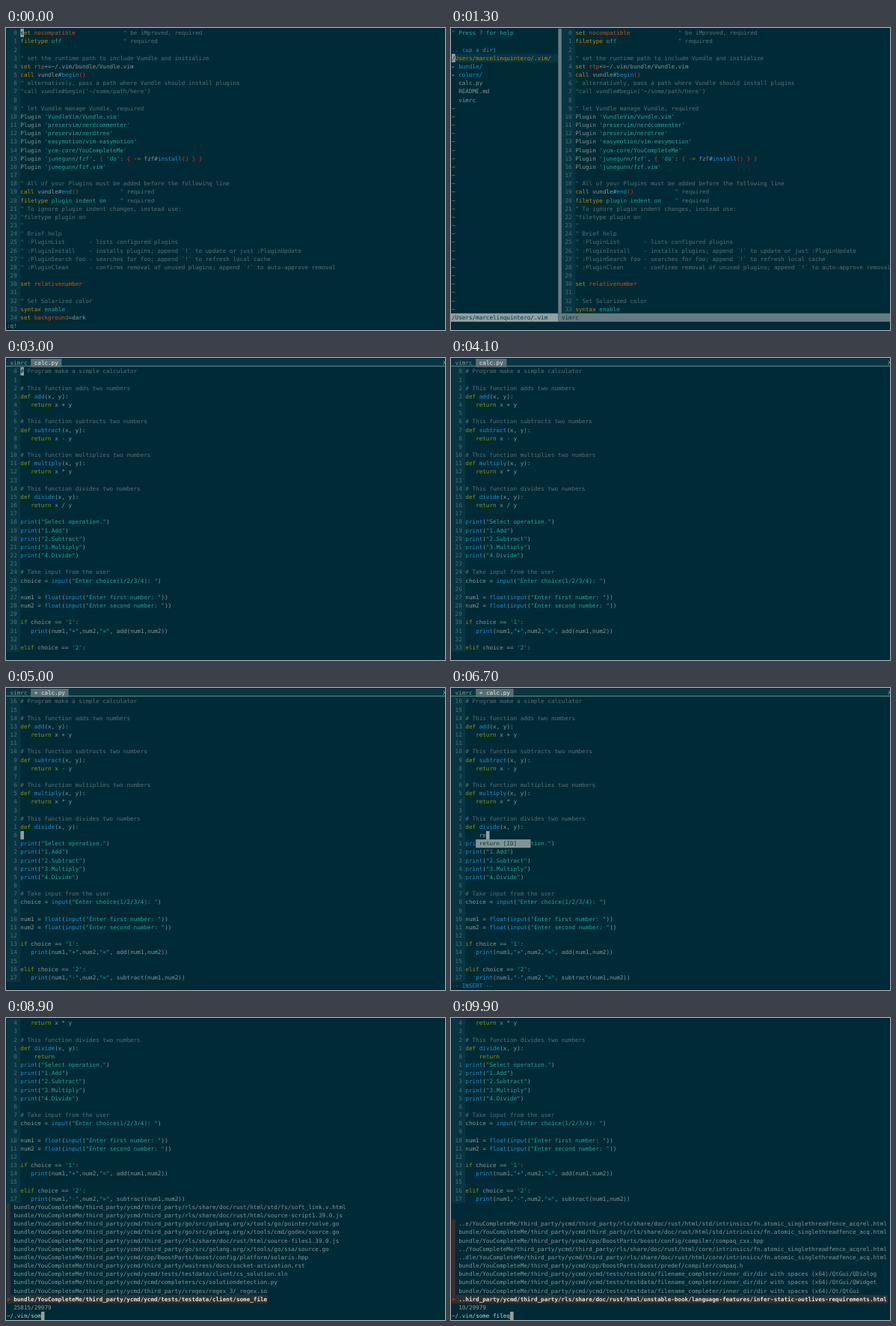
Recreate the animation shown at these times as an HTML page. Size 587 by 403 pixels, loop 10000 ms.

```html
<!DOCTYPE html>
<html lang="en">
<head>
<meta charset="utf-8">
<title>Vim session</title>
<style>
  html, body { margin: 0; width: 100%; height: 100%; overflow: hidden; background: #002b36; }
  svg { display: block; width: 587px; height: 403px; }
  text {
    font: 7.624px "DejaVu Sans Mono", "Noto Sans Mono", monospace;
    white-space: pre;
    text-rendering: geometricPrecision;
  }
  .bold { font-weight: bold; }
</style>
</head>
<body>
<svg id="screen" viewBox="0 0 587 403"></svg>
<script>
const CW = 4.59, RH = 11.17, PAD = 1, BASELINE = 9.2;
const LOOP = 10000, STEP = 100;
const C = {
  bg: '#002b36', panel: '#073642', dim: '#586e75', mid: '#657b83', fg: '#839496',
  light: '#93a1a1', pale: '#eee8d5', yellow: '#b58900', orange: '#cb4b16', red: '#dc322f',
  blue: '#268bd2', cyan: '#2aa198', green: '#859900'
};

const vimrc = `set nocompatible              " be iMproved, required
filetype off                  " required

" set the runtime path to include Vundle and initialize
set rtp+=~/.vim/bundle/Vundle.vim
call vundle#begin()
" alternatively, pass a path where Vundle should install plugins
"call vundle#begin('~/some/path/here')

" let Vundle manage Vundle, required
Plugin 'VundleVim/Vundle.vim'
Plugin 'preservim/nerdcommenter'
Plugin 'preservim/nerdtree'
Plugin 'easymotion/vim-easymotion'
Plugin 'ycm-core/YouCompleteMe'
Plugin 'junegunn/fzf', { 'do': { -> fzf#install() } }
Plugin 'junegunn/fzf.vim'

" All of your Plugins must be added before the following line
call vundle#end()            " required
filetype plugin indent on    " required
" To ignore plugin indent changes, instead use:
"filetype plugin on
"
" Brief help
" :PluginList       - lists configured plugins
" :PluginInstall    - installs plugins; append \`!\` to update or just :PluginUpdate
" :PluginSearch foo - searches for foo; append \`!\` to refresh local cache
" :PluginClean      - confirms removal of unused plugins; append \`!\` to auto-approve removal

set relativenumber

" Set Solarized color
syntax enable
set background=dark`.split('\n');

const calc = `# Program make a simple calculator

# This function adds two numbers
def add(x, y):
   return x + y

# This function subtracts two numbers
def subtract(x, y):
   return x - y

# This function multiplies two numbers
def multiply(x, y):
   return x * y

# This function divides two numbers
def divide(x, y):
   return x / y

print("Select operation.")
print("1.Add")
print("2.Subtract")
print("3.Multiply")
print("4.Divide")

# Take input from the user
choice = input("Enter choice(1/2/3/4): ")

num1 = float(input("Enter first number: "))
num2 = float(input("Enter second number: "))

if choice == '1':
   print(num1,"+",num2,"=", add(num1,num2))

elif choice == '2':
   print(num1,"-",num2,"=", subtract(num1,num2))`.split('\n');

const syntax = rules => ({
  pattern: new RegExp(rules.map(r => `(${r[0]})`).join('|'), 'g'),
  colors: rules.map(r => r[1])
});
const vimSyntax = syntax([
  ['".*', C.dim],
  ["'[^']*'", C.cyan],
  ['^(?:set|filetype|call|syntax)\\b', C.yellow],
  ['\\b(?:nocompatible|rtp|relativenumber|background)\\b', C.orange],
  ['\\b(?:off|plugin indent on|enable)\\b', C.cyan],
  ['(?<=#)\\w+', C.blue],
  ['->', C.green],
  ['[(){}]', C.red]
]);
const pySyntax = syntax([
  ['#.*', C.dim],
  [`"[^"]*"|'[^']*'`, C.cyan],
  ['\\b(?:def|return|if|elif)\\b', C.green],
  ['\\b(?:print|input|float)\\b|(?<=def )\\w+', C.blue]
]);

const home = '/Users/marcelinquintero/.vim';
const treeNodes = [
  ['" Press ? for help', C.cyan], ['', C.fg], ['.. (up a dir)', C.blue],
  [home + '/', C.yellow], ['▸ bundle/', C.blue], ['▸ colors/', C.blue],
  ['  calc.py', C.fg], ['  README.md', C.fg], ['  vimrc', C.fg]
];

const ycm = 'YouCompleteMe/third_party/ycmd/';
const root = 'bundle/' + ycm;
const rust = 'third_party/rls/share/doc/rust/html/';
const goTools = 'third_party/go/src/golang.org/x/tools/';
const fence = 'intrinsics/fn.atomic_singlethreadfence_';
const spaced = 'ycmd/tests/testdata/filename_completer/inner_dir/dir with spaces (x64)/';
const broadHits = [
  rust + 'std/fs/soft_link.v.html',
  rust + 'source-script1.39.0.js',
  goTools + 'go/pointer/solve.go',
  goTools + 'cmd/godex/source.go',
  rust + 'source-files1.39.0.js',
  goTools + 'go/ssa/source.go',
  'cpp/BoostParts/boost/config/platform/solaris.hpp',
  'third_party/waitress/docs/socket-activation.rst',
  'ycmd/tests/testdata/client/cs_solution.sln',
  'ycmd/completers/cs/solutiondetection.py',
  'third_party/cregex/regex_3/_regex.so',
  'ycmd/tests/testdata/client/some_file'
].map(p => root + p);
const narrowHits = [
  '..e/' + ycm + rust + 'std/' + fence + 'acqrel.html',
  root + rust + 'std/' + fence + 'acq.html',
  root + 'cpp/BoostParts/boost/config/compiler/compaq_cxx.hpp',
  '../' + ycm + rust + 'core/' + fence + 'acqrel.html',
  '..dle/' + ycm + rust + 'core/' + fence + 'acq.html',
  root + 'cpp/BoostParts/boost/predef/compiler/compaq.h',
  root + spaced + 'QtGui/QDialog',
  root + spaced + 'QtGui/QWidget',
  root + spaced + 'Qt/QtGui',
  '..hird_party/ycmd/' + rust + 'unstable-book/language-features/infer-static-outlives-requirements.html'
];
const hitCounts = [29979, 29102, 27440, 25815, 24630, 24630, 9120, 7436, 5212, 4087, 10];

// Steps at which each key lands
const returnKeys = [64, 67, 69, 70, 71, 72, 74];
const queryKeys = [87, 88, 89, 90, 91, 93, 94, 95, 96, 98];
const pressed = (keys, s) => keys.filter(k => s >= k).length;

let out = '';
const escape = str => str.replace(/&/g, '&amp;').replace(/</g, '&lt;').replace(/>/g, '&gt;');

function box(col, row, w, h, fill) {
  out += `<rect x="${PAD + col * CW}" y="${PAD + row * RH}" width="${w * CW}" height="${h * RH}" fill="${fill}"/>`;
}

function put(col, row, str, fill = C.fg, bold = false) {
  if (!str.trim()) return;
  out += `<text x="${PAD + col * CW}" y="${BASELINE + row * RH}" fill="${fill}"${bold ? ' class="bold"' : ''}>${escape(str)}</text>`;
}

function cursor(col, row, char = '') {
  box(col, row, 1, 1, C.light);
  put(col, row, char, C.bg);
}

function command(str) {
  put(0, 35, str);
  cursor(str.length, 35);
}

function code(col, row, line, { pattern, colors }) {
  let at = 0;
  for (const m of line.matchAll(pattern)) {
    put(col + at, row, line.slice(at, m.index));
    put(col + m.index, row, m[0], colors[m.slice(1).findIndex(g => g !== undefined)]);
    at = m.index + m[0].length;
  }
  put(col + at, row, line.slice(at));
}

function buffer(lines, lang, { col = 0, row = 0, rows, cur = 0, top = 0 }) {
  box(col, row, 4, rows, C.panel);
  for (let i = 0; i < rows && top + i < lines.length; i++) {
    put(col, row + i, String(Math.abs(top + i - cur)).padStart(3), C.dim);
    code(col + 4, row + i, lines[top + i], lang);
  }
}

function tabs(labels, active) {
  box(-1, 0, 130, 1, C.panel);
  out += `<rect x="0" y="10.4" width="587" height="0.9" fill="${C.fg}"/>`;
  let col = 0;
  labels.forEach((label, i) => {
    const on = i === active, w = label.length + 2;
    if (on) box(col, 0, w, 1, C.dim);
    put(col + 1, 0, label, on ? C.pale : C.fg);
    if (label[0] === '2') {
      if (on) box(col + 1, 0, 1, 1, C.dim);
      else box(col + 1, 0, 1, 0.8, C.panel);
      put(col + 1, 0, '2', C.red, true);
    }
    col += w;
  });
  put(127, 0, 'X');
}

function treeView(row, picked) {
  buffer(vimrc, vimSyntax, { col: 32, row, rows: 34 - row });
  box(0, row + picked, 31, 1, C.panel);
  for (let i = 0; row + i < 34; i++) put(0, row + i, ...(treeNodes[i] || ['~']));
  box(31, row, 1, 34 - row, C.mid);
  box(-1, 34, 32, 1, C.light);
  put(0, 34, home, C.panel);
  box(31, 34, 97, 1, C.mid);
  put(32, 34, 'vimrc', C.panel);
}

function editedLines(s) {
  const indent = ' '.repeat(Math.max(0, Math.min(4, s - 53)));
  const line = indent + 'return '.slice(0, pressed(returnKeys, s));
  return [...calc.slice(0, 16), line, ...calc.slice(18)];
}

function calcView(s) {
  const edited = s >= 50;
  const lines = edited ? editedLines(s) : calc;
  const cur = Math.max(0, Math.min(16, Math.round((s - 41) * 16 / 6)));
  tabs(['vimrc', edited ? '+ calc.py' : 'calc.py'], 1);
  buffer(lines, pySyntax, { row: 1, rows: 34, cur });
  if (s >= 67 && s < 74) {
    box(7, 18, 16, 1, C.fg);
    put(8, 18, 'return [ID]', C.panel);
  }
  if (s >= 51 && s < 76) put(0, 35, '-- INSERT --', C.blue);
  if (s >= 80) command(':FZF'.slice(0, s - 79));
  else if (edited) cursor(4 + lines[16].length - (s >= 76 ? 1 : 0), 17);
  else if (s < 32 || s > 41) cursor(4, cur + 1, lines[cur][0]);
}

function finderView(s) {
  const typed = pressed(queryKeys, s);
  const query = 'some fileq'.slice(0, typed);
  const hits = typed === 10 ? narrowHits : broadHits;
  const first = 34 - hits.length;
  buffer(editedLines(s), pySyntax, { rows: 22, cur: 16, top: 12 });
  box(0, first, 1, hits.length, '#3a3030');
  hits.slice(0, -1).forEach((hit, i) => put(2, first + i, hit));
  const best = hits[hits.length - 1];
  box(0, 33, best.length + 2, 1, '#303030');
  put(0, 33, '>', C.red, true);
  put(2, 33, best, '#e4e4e4', true);
  put(2, 34, `${hitCounts[typed]}/29979`, '#929d88');
  put(0, 35, '~/.vim/', '#a9bfd0');
  put(7, 35, query, '#c8d0d0');
  cursor(7 + query.length, 35);
}

function draw(s) {
  out = '';
  if (s < 13) {
    buffer(vimrc, vimSyntax, { rows: 35 });
    if (s < 4) {
      put(0, 35, ':q!');
      cursor(4, 0, 's');
    } else command(':NERDTree'.slice(0, s - 3));
  } else if (s < 20) {
    const row = 3 + Math.min(3, Math.floor((s - 12) / 2));
    treeView(0, row);
    cursor(0, row, treeNodes[row][0][0]);
  } else if (s < 23) {
    tabs(['2 NERD_tree_3', 'calc.py'], 1);
    buffer(calc, pySyntax, { row: 1, rows: 34 });
    cursor(4, 1, '#');
  } else if (s < 26) {
    tabs(['2 NERD_tree_3', 'calc.py'], 0);
    treeView(1, 6);
    if (s < 24) cursor(0, 7);
    else command(':q'.slice(0, s - 23));
  } else if (s < 29) {
    tabs(['vimrc', 'calc.py'], 0);
    buffer(vimrc, vimSyntax, { row: 1, rows: 34 });
    cursor(4, 1, 's');
  } else if (s < 84) calcView(s);
  else finderView(s);
  return out;
}

const screen = document.getElementById('screen');
let shown = -1;
function tick() {
  const s = Math.floor(performance.now() % LOOP / STEP);
  if (s !== shown) {
    screen.innerHTML = draw(s);
    shown = s;
  }
  requestAnimationFrame(tick);
}
tick();
</script>
</body>
</html>
```
